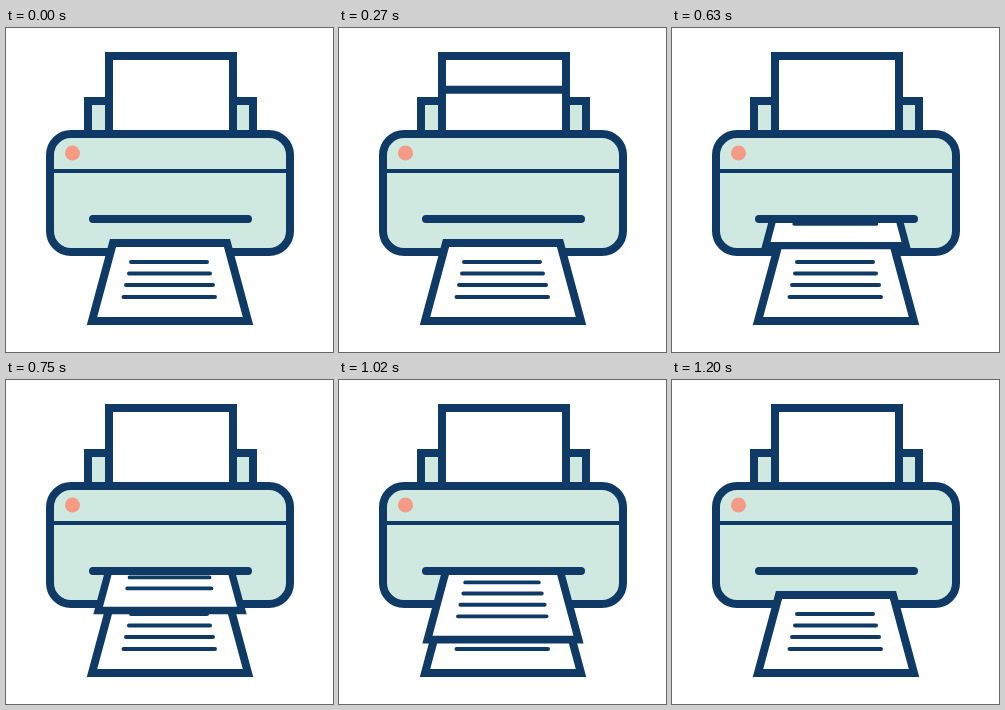
These frames come from a looping animation (327 px wide and 324 px high, 1.65 s). An HTML page:

```html
<!DOCTYPE html>
<html lang="en">
<head>
<meta charset="utf-8">
<title>Printer</title>
<style>
  html, body { margin: 0; width: 100%; height: 100%; overflow: hidden; background: #fff; }
  svg { display: block; width: 327px; height: 324px; }
  .ink { stroke: #103a66; stroke-width: 8; }
  .thin { stroke-width: 4; stroke-linecap: round; }
  .mint { fill: #cfe9e0; }
  .paper { fill: #fff; }
</style>
</head>
<body>
<svg viewBox="0 0 327 324">
  <defs>
    <clipPath id="belowSlot"><rect y="191" width="327" height="133"/></clipPath>
    <!-- Printed page, measured from the middle of its bottom edge -->
    <g id="page" class="ink">
      <path class="paper" d="M-57-78H57L78 0H-78Z"/>
      <path class="thin" d="M-39-59H37M-41-47.5H40M-44-36H43M-46.5-24H45"/>
    </g>
  </defs>
  <g class="ink">
    <path class="mint" d="M82 120V73H247V120Z"/>
    <path class="paper" d="M103 120V28H227V120Z"/>
    <path id="feed" d="M103 28H227"/>
    <rect class="mint" x="44" y="106" width="240" height="118" rx="21"/>
    <path class="thin" d="M44 143H284"/>
  </g>
  <circle cx="66.5" cy="125" r="7.5" fill="#f59b85"/>
  <use href="#page" x="164" y="293"/>
  <g clip-path="url(#belowSlot)"><use id="print" href="#page"/></g>
  <path class="ink" stroke-linecap="round" d="M87 191H242"/>
</svg>
<script>
  const LOOP = 1650, STEP = 30, RELEASE = 1080, LANDED = 1200;
  const feed = document.getElementById('feed');
  const print = document.getElementById('print');

  function draw(t) {
    // The top sheet is pulled in, slowing slightly
    feed.setAttribute('transform', `translate(0 ${0.13 * t - 0.000017 * t * t})`);
    feed.style.display = t < 600 ? '' : 'none';

    // The print comes out steadily, then drops onto the tray
    const bottom = t < RELEASE
      ? 266 - 0.1074 * (RELEASE - t)
      : 266 + 27 * (t - RELEASE) / (LANDED - RELEASE);
    const scale = 1 - 0.000175 * (LANDED - t);
    print.setAttribute('transform', `translate(164 ${bottom}) scale(${scale})`);
    print.style.display = t < LANDED ? '' : 'none';
  }

  const start = performance.now();
  function tick() {
    const t = (performance.now() - start) % LOOP;
    draw(Math.floor(t / STEP) * STEP);
    requestAnimationFrame(tick);
  }
  tick();
</script>
</body>
</html>
```
